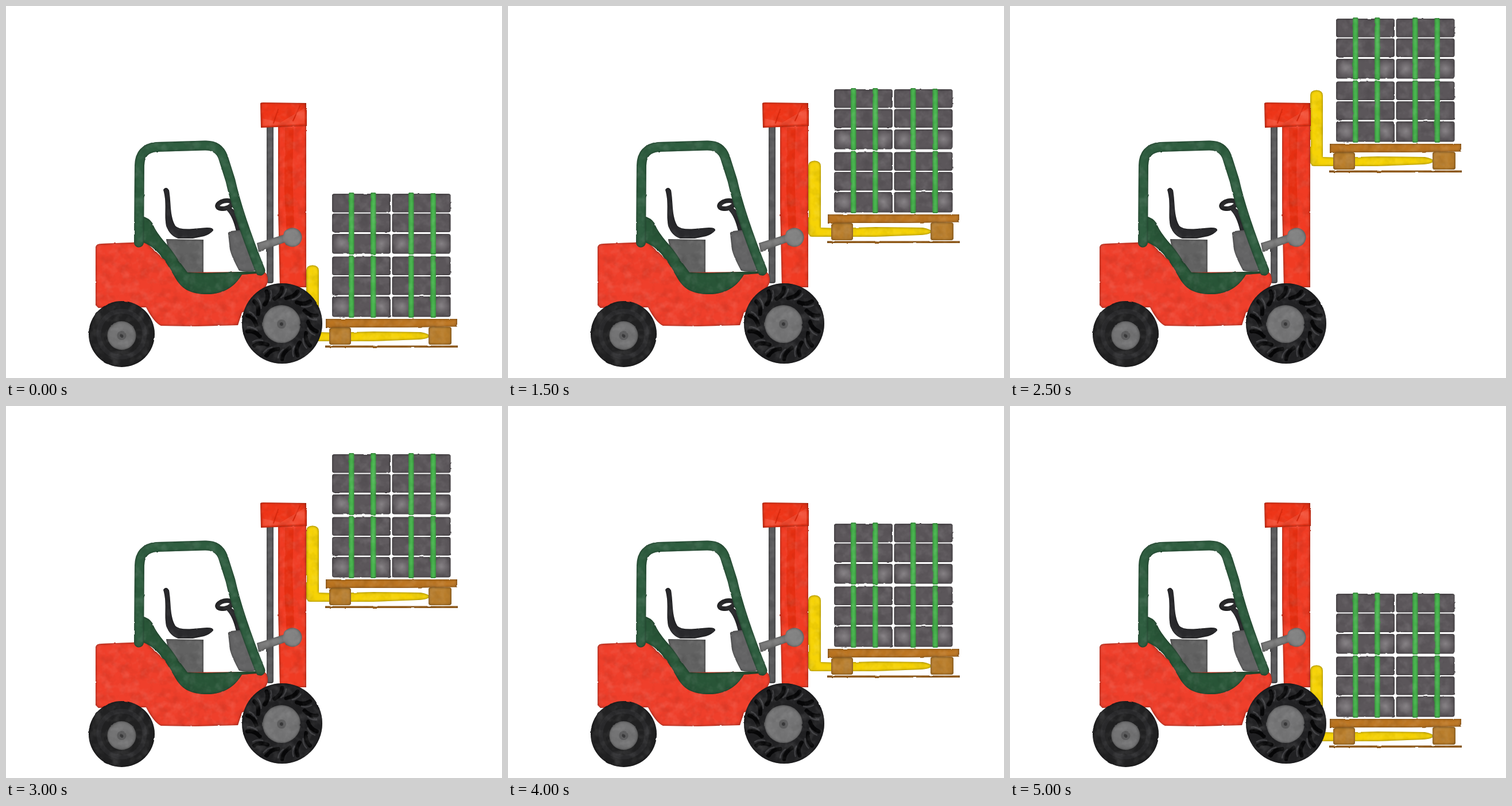
These frames come from a looping animation (864x648 px, 5500 ms). An HTML page:

```html
<!DOCTYPE html>
<html lang="en">
<head>
<meta charset="utf-8">
<title>Forklift</title>
<style>
html, body { margin: 0; width: 100%; height: 100%; overflow: hidden; background: #fff; }
svg { display: block; width: 864px; height: 648px; }
.clay { filter: url(#clay); }
.line { fill: none; stroke-linecap: round; stroke-linejoin: round; }
</style>
</head>
<body>
<svg viewBox="0 0 864 648">
  <defs>
    <!-- Uneven edges, dark rims and faint mottling of modelling clay -->
    <filter id="clay" x="-15%" y="-15%" width="130%" height="130%" color-interpolation-filters="sRGB">
      <feTurbulence type="fractalNoise" baseFrequency=".06" numOctaves="3" seed="4" result="noise"/>
      <feDisplacementMap in="SourceGraphic" in2="noise" scale="2" xChannelSelector="R" yChannelSelector="G" result="shape"/>
      <feGaussianBlur in="shape" stdDeviation="2" result="soft"/>
      <feFlood flood-color="#000" flood-opacity=".5"/>
      <feComposite in2="soft" operator="out"/>
      <feComposite in2="shape" operator="in" result="rim"/>
      <feColorMatrix in="noise" values="0 0 0 0 0  0 0 0 0 0  0 0 0 0 0  .2 0 0 0 -.09"/>
      <feComposite in2="shape" operator="in" result="dark"/>
      <feColorMatrix in="noise" values="0 0 0 0 1  0 0 0 0 1  0 0 0 0 1  0 .25 0 0 -.11"/>
      <feComposite in2="shape" operator="in" result="light"/>
      <feMerge>
        <feMergeNode in="shape"/><feMergeNode in="dark"/><feMergeNode in="light"/><feMergeNode in="rim"/>
      </feMerge>
    </filter>
    <radialGradient id="shine">
      <stop stop-color="#aaa6a9" stop-opacity=".55"/>
      <stop offset="1" stop-color="#aaa6a9" stop-opacity="0"/>
    </radialGradient>
  </defs>

  <g id="load">
    <path class="clay" fill="#f6d306" d="M523 460Q523 452 534 451.500Q545 452 545 461V568L570 569L640 567L722 568Q738 571 738 575Q736 580 718 581L640 584H530Q523 584 523 577Z"/>
    <g class="clay" fill="#b97d2b">
      <rect x="563" y="560" width="38" height="30" rx="4"/>
      <rect x="736" y="559" width="40" height="31" rx="4"/>
    </g>
    <g class="clay" fill="#bd7622">
      <path d="M557 545H786V558.500L700 560H557Z"/>
      <path d="M556 591.500H787V595H556Z"/>
    </g>
    <g id="bricks" class="clay" fill="#5b565a"></g>
    <g id="shines" fill="url(#shine)"></g>
    <g id="straps" class="clay" fill="#4bb951"></g>
  </g>

  <rect class="clay" x="454" y="208" width="12" height="275" rx="4" fill="#5b5b5d"/>
  <g class="clay">
    <path fill="#f03b23" d="M474 205H523V490H477L474 350Z"/>
    <path fill="#e62f12" d="M486 212H501L499 290L502 385L489 400L485 320Z"/>
  </g>
  <g class="clay">
    <path fill="#ee3518" d="M443 170Q443 168 448 168L524 169V209L444 212Z"/>
    <path fill="#f2492f" d="M447 196L478 203L520 178V205L447 209Z"/>
    <path class="line" stroke="#d9280d" stroke-width="2" d="M466 204L474 180M500 200L512 174"/>
  </g>
  <g class="clay" fill="#7a7a7a">
    <path d="M437 413L488 397V411L440 428Z"/>
    <circle cx="499" cy="403" r="16.500" fill="#838383"/>
  </g>

  <path class="clay" fill="#626262" d="M279 406L344 407V467H290Z"/>
  <path class="clay" fill="#2b2b2e" d="M274 320Q279 313 284 321C288 345 285 365 295 383Q300 389 320 388.500L350 386Q362 386 361 391Q355 398 345 401L325 405L300 405Q285 400 279 383C275 360 281 345 274 320Z"/>
  <g class="clay">
    <path class="line" stroke="#2b2b2e" stroke-width="9" d="M388 353Q399 364 405 390"/>
    <ellipse cx="381" cy="346" rx="13" ry="6.500" transform="rotate(-14 381 346)" fill="#fff" stroke="#29292b" stroke-width="8"/>
  </g>
  <path class="clay" fill="#646465" d="M387 397Q386 392 392 392L411 390L424 420L440 460Q420 465 406 461Q393 437 390 424Z"/>

  <path class="clay" fill="#ef3f2b" d="M156 420Q157 414 166 414L243 411L300 464L436 463L450 463Q457 467 456 481C446 505 428 528 411 534L404 556L330 558L270 557C260 552 252 540 244 525C215 525 185 525 161 526L156 521Z"/>
  <path class="clay" fill="#295638" d="M237 366Q249 369 255 378C264 402 286 418 299 441L316 464L350 465L436 462V466L411 468C402 482 388 500 355 502C323 503 306 494 294 472C277 442 262 420 237 411Z"/>
  <path class="clay line" stroke="#2f5e40" stroke-width="17" stroke-linecap="butt" d="M231.500 412L232.500 278Q233 248 262 245.500L346 243Q370 242 378 263L391 304Q404 363 443 461"/>

  <g class="clay">
    <circle cx="201.500" cy="571.500" r="57.500" fill="#212122"/>
    <circle cx="201.500" cy="571.500" r="40" fill="none" stroke="#2a2a2c" stroke-width="8"/>
  </g>
  <g class="clay">
    <circle cx="481" cy="553" r="70" fill="#212123"/>
    <g id="treads" transform="translate(481 553)" class="line"></g>
  </g>
  <g id="hubs"></g>
</svg>
<script>
const get = id => document.getElementById(id);
const rect = (x, y, w, h, r) => `<rect x="${x}" y="${y}" width="${w}" height="${h}" rx="${r}"/>`;
const shine = (x, y) => `<ellipse cx="${x}" cy="${y}" rx="16" ry="15"/>`;

const rows = [[327, 32.5], [361.5, 32.5], [397, 34.5], [436.5, 32.5], [471, 32.5], [506, 35.5]];
const columns = [568, 672.5];
for (const x of columns) {
  rows.forEach(([y, h], i) => {
    get('bricks').innerHTML += rect(x, y, 102, h, 4);
    if (i % 3 == 2) get('shines').innerHTML += shine(x + 17, y + 17) + shine(x + 86, y + 17);
  });
}
for (const x of [597, 635, 701, 739.5]) {
  get('straps').innerHTML += rect(x, 325, 9.5, 108, 2) + rect(x, 434.5, 9.5, 108.5, 2);
}

for (let i = 0; i < 14; i++) {
  get('treads').innerHTML += `<g transform="rotate(${i * 360 / 14})">
    <path d="M0 -62Q-1 -50 -13 -43" stroke="#070708" stroke-width="7"/>
    <path d="M7 -60Q6 -51 -2 -45" stroke="#3f3f42" stroke-width="2.5"/></g>`;
}

for (const [x, y, r] of [[201.5, 574, 25], [480, 554, 33]]) {
  get('hubs').innerHTML += `<g class="clay"><circle cx="${x}" cy="${y}" r="${r}" fill="#747475"/>
    <circle cx="${x}" cy="${y}" r="8" fill="#5e5e5f"/>
    <circle cx="${x}" cy="${y}" r="3" fill="#39393a"/></g>`;
}

const STEP = 500, LOOP = 5500;
const lifts = [0, 62, 122, 182, 243, 305];
const start = performance.now();
let shown = -1;
function draw() {
  const k = Math.floor((performance.now() - start) % LOOP / STEP);
  const level = Math.min(k, 10 - k);
  if (level != shown) get('load').setAttribute('transform', `translate(0 ${-lifts[level]})`);
  shown = level;
  requestAnimationFrame(draw);
}
draw();
</script>
</body>
</html>
```
